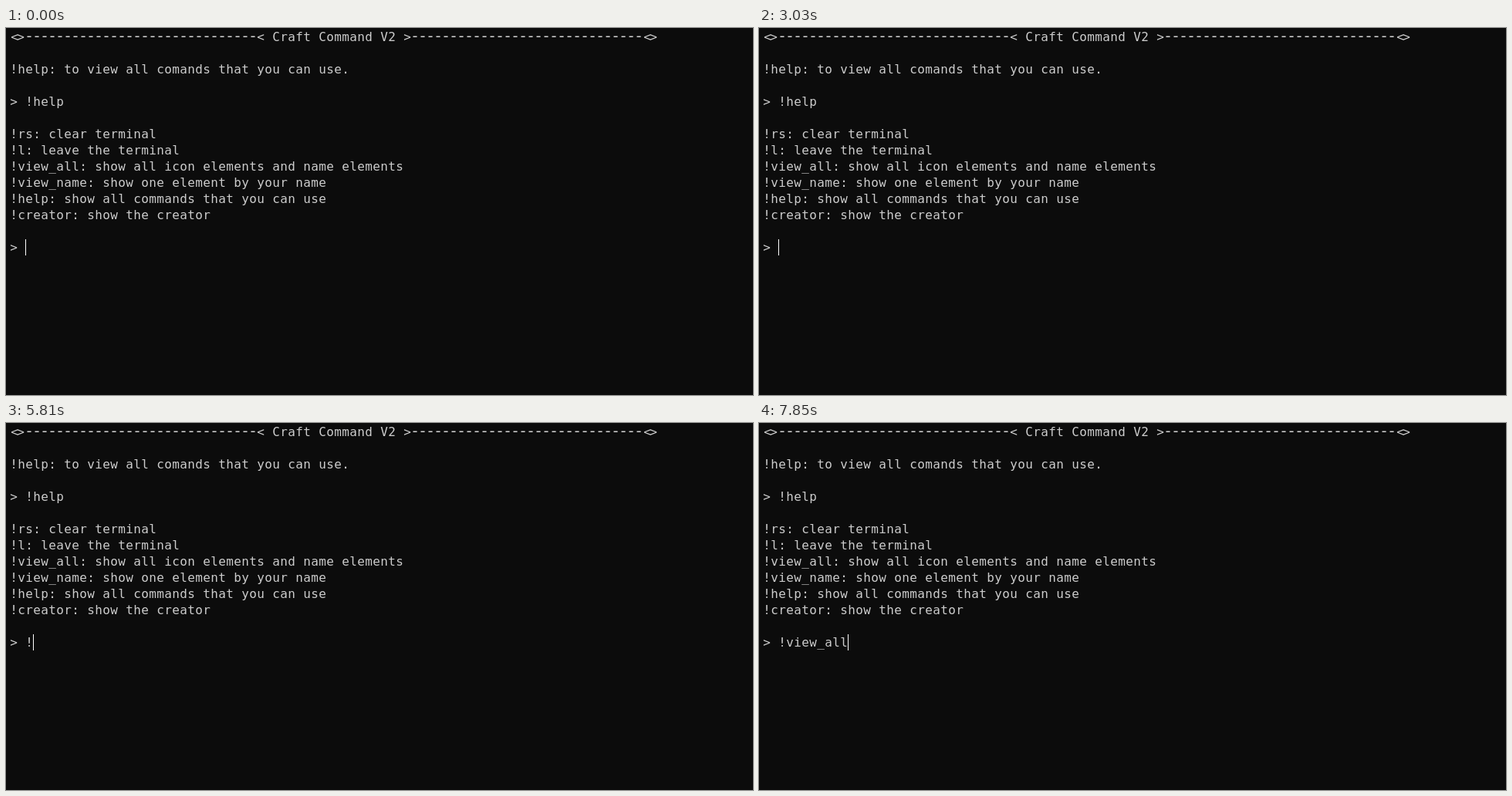
An HTML page for the animation above (8 s loop, 968 by 476 pixels).

```html
<!DOCTYPE html>
<html lang="en">
<head>
<meta charset="utf-8">
<title>Terminal</title>
<style>
  html, body { margin: 0; width: 100%; height: 100%; overflow: hidden; background: #0c0c0c; }
  svg { display: block; }
  text {
    font-family: "DejaVu Sans Mono", "Noto Sans Mono", monospace;
    font-size: 16px;
    font-variant-ligatures: none;
    text-anchor: middle;
    fill: #ccc;
    white-space: pre;
  }
  .rule { font-size: 20px; }
</style>
</head>
<body>
<svg id="stage" width="968" height="476" viewBox="0 0 968 476"></svg>
<script>
const NS = "http://www.w3.org/2000/svg";
const LOOP = 8000, LEFT = 5, CELL = 10, ROW = 21;
const PROMPT_ROW = 13;
const stage = document.getElementById("stage");

function add(tag, attrs) {
  const el = document.createElementNS(NS, tag);
  for (const key in attrs) el.setAttribute(key, attrs[key]);
  return stage.appendChild(el);
}

const cellX = col => LEFT + col * CELL;

// Each character is centred in its own cell of the terminal grid.
function print(str, col, row, cls = "") {
  const x = [...str].map((_, i) => cellX(col + i + 0.5)).join(" ");
  const el = add("text", { x, y: 17 + row * ROW, class: cls });
  el.textContent = str;
  return el;
}

// Angle brackets pushed together into a diamond.
function diamond(col) {
  print("<", col + 0.1, 0);
  print(">", col + 0.9, 0);
}

const rule = "-".repeat(30);
diamond(0);
print(rule, 2, 0, "rule");
print("< Craft Command V2 >", 32, 0);
print(rule, 52, 0, "rule");
diamond(82);

const screen = `
!help: to view all comands that you can use.

> !help

!rs: clear terminal
!l: leave the terminal
!view_all: show all icon elements and name elements
!view_name: show one element by your name
!help: show all commands that you can use
!creator: show the creator

>`;
screen.split("\n").forEach((line, i) => print(line, 0, i + 1));

// The command grows by these pieces at the given times.
const keys = { 4420: "!", 6180: "vi", 6330: "ew", 7480: "_", 7730: "a", 7850: "ll" };
const FIRST_KEY = 4420;

const command = Object.values(keys).join("");
const glyphs = [...command].map((ch, i) => print(ch, 2 + i, PROMPT_ROW));
const caret = add("rect", { y: 1 + PROMPT_ROW * ROW, width: 1, height: ROW, fill: "#fff" });

const show = (el, on) => el.setAttribute("visibility", on ? "visible" : "hidden");

// Idle blinking toggles every 4 1/3 ticks; typing leaves one pause.
const TICK = 126, BLINK = 13 / 3;
function caretOn(t) {
  if (t >= FIRST_KEY) return t < 5180 || t >= 5810;
  const tick = Math.floor(t / TICK);
  const toggles = Math.ceil((tick - 2) / BLINK);
  return toggles % 2 === 0;
}

function draw() {
  const t = performance.now() % LOOP;
  let count = 0;
  for (const at in keys) if (t >= at) count += keys[at].length;
  glyphs.forEach((el, i) => show(el, i < count));
  caret.setAttribute("x", cellX(2 + count));
  show(caret, caretOn(t));
  requestAnimationFrame(draw);
}
draw();
</script>
</body>
</html>
```
